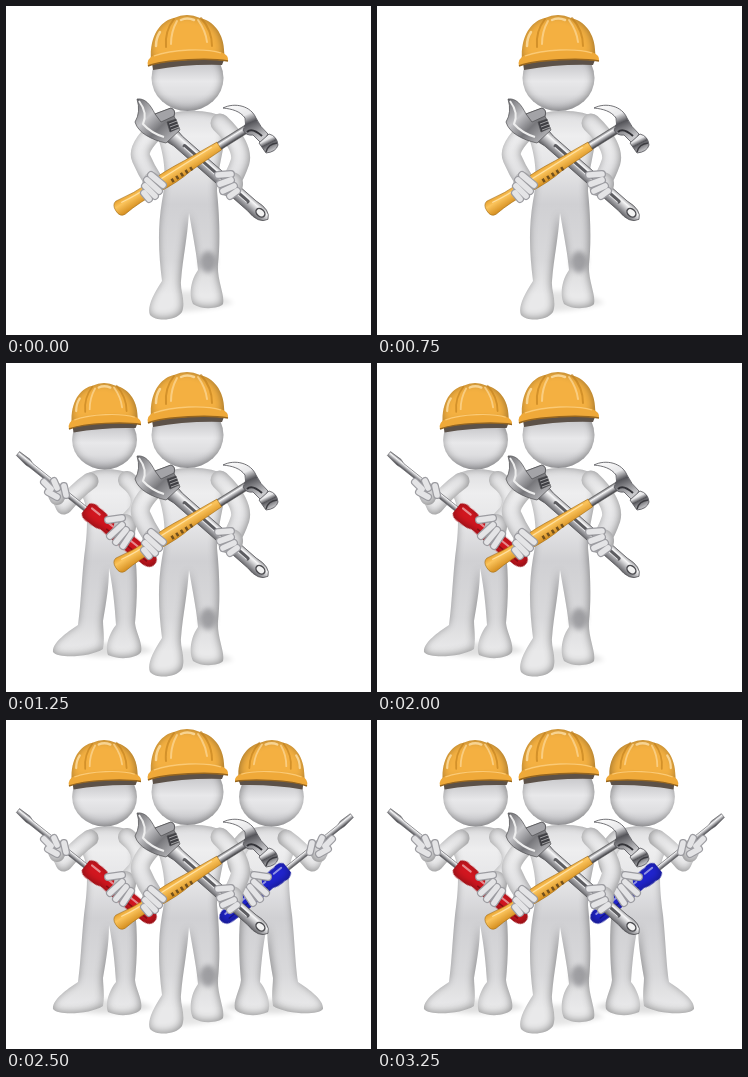
Recreate the animation shown at these times as an HTML page. Size 365 by 329 pixels, loop 3.75 s.

```html
<!DOCTYPE html>
<html lang="en">
<head>
<meta charset="utf-8">
<title>Three workers</title>
<style>
html, body { margin: 0; width: 100%; height: 100%; overflow: hidden; background: #fff; }
svg { display: block; width: 100vw; height: 100vh; }
path { stroke-linejoin: round; }
.body > * { fill: url(#skin); filter: url(#shade); }
.arm { fill: none !important; stroke: url(#skin); stroke-linecap: round; }
.fingers { fill: none; stroke-linecap: round; }
.fingers path:first-child { stroke: #9c9ca1; stroke-width: 8; }
.fingers path:last-child { stroke: #e4e4e6; stroke-width: 5.6; }
.palm { fill: #e2e2e4; filter: url(#shade); }
.soft { filter: url(#blur); }
.driver { transform: scale(var(--size)); }
</style>
</head>
<body>
<svg viewBox="0 0 365 329">
<defs>
  <!-- darkens the rim of a shape, mostly at the lower right -->
  <filter id="shade" filterUnits="userSpaceOnUse" x="-200" y="-50" width="600" height="420" color-interpolation-filters="sRGB">
    <feGaussianBlur in="SourceAlpha" stdDeviation="4.5"/>
    <feOffset dx="-1" dy="-1" result="core"/>
    <feComposite in="SourceAlpha" in2="core" operator="out"/>
    <feComponentTransfer result="rim"><feFuncA type="linear" slope=".4"/></feComponentTransfer>
    <feMerge><feMergeNode in="SourceGraphic"/><feMergeNode in="rim"/></feMerge>
  </filter>
  <filter id="blur" x="-50%" y="-50%" width="200%" height="200%"><feGaussianBlur stdDeviation="2.5"/></filter>
  <linearGradient id="skin" gradientUnits="userSpaceOnUse" x1="0" y1="104" x2="0" y2="304">
    <stop stop-color="#dcdcde"/><stop offset=".13" stop-color="#eeeeef"/>
    <stop offset=".3" stop-color="#e4e4e6"/><stop offset=".47" stop-color="#d0d0d3"/>
    <stop offset=".75" stop-color="#d9d9db"/><stop offset=".92" stop-color="#e9e9ea"/>
  </linearGradient>
  <linearGradient id="face" x2="0" y2="1">
    <stop offset=".25" stop-color="#c4c4c7"/><stop offset=".55" stop-color="#e8e8ea"/>
    <stop offset=".75" stop-color="#dedee0"/><stop offset="1" stop-color="#bcbcc0"/>
  </linearGradient>
  <linearGradient id="steel" x2="0" y2="1">
    <stop stop-color="#67676b"/><stop offset=".3" stop-color="#f7f7f8"/>
    <stop offset=".6" stop-color="#a2a2a6"/><stop offset="1" stop-color="#343438"/>
  </linearGradient>
  <linearGradient id="jaw" x2="1" y2="1">
    <stop stop-color="#66666a"/><stop offset=".35" stop-color="#c4c4c7"/>
    <stop offset=".6" stop-color="#77777b"/><stop offset="1" stop-color="#cfcfd2"/>
  </linearGradient>
  <linearGradient id="chrome" x2=".5" y2="1">
    <stop stop-color="#fff"/><stop offset=".4" stop-color="#e8e8ea"/>
    <stop offset=".6" stop-color="#55555a"/><stop offset="1" stop-color="#c9c9cc"/>
  </linearGradient>
  <linearGradient id="grip" x2="0" y2="1">
    <stop stop-color="#e7a02c"/><stop offset=".35" stop-color="#fbc45c"/><stop offset="1" stop-color="#d48d1e"/>
  </linearGradient>

  <g id="head">
    <ellipse cx="181.5" cy="72" rx="36" ry="33" fill="url(#face)" filter="url(#shade)"/>
    <path d="M146 57Q180 50 218 54L216 59Q180 58 147 64Z" fill="#5c5148"/>
    <path d="M145 55C143 27 157 14 168 12Q181 6 194 12C208 15 220 29 218 52Z" fill="#f4b041" filter="url(#shade)"/>
    <g fill="none" stroke-linecap="round">
      <path d="M168 13C161 22 159 31 160 41M195 12C203 21 206 30 206 40" stroke="#bf7d1b" stroke-width="2" opacity=".6"/>
      <path d="M171 15C167 22 165 30 165 38M192 14C197 21 200 28 201 36" stroke="#fcd590" stroke-width="2" opacity=".8"/>
      <path d="M175 14Q181 11 188 14M154 26Q150 32 150 40" stroke="#fde0a8" stroke-width="2.5" opacity=".8"/>
    </g>
    <path d="M142 60Q140 53 148 49C165 42 201 41 215 46Q223 49 222 55C205 52 160 53 142 60Z" fill="#efa939"/>
    <path d="M148 50C166 43 200 42 215 47" fill="none" stroke="#fbca75" stroke-width="1.3"/>
    <path d="M142 60C160 53 205 52 222 55" fill="none" stroke="#96651e" stroke-width="1.5"/>
  </g>

  <g id="driver">
    <path d="M-176-3L-163-3.5L-158-2H-84V3H-158L-163 3.5L-176 2Z" fill="url(#steel)" stroke="#66666a" stroke-width=".6"/>
    <path d="M-89-6Q-85-11-78-9Q-70-10-64-7Q-40-9-12-8Q0-8 0 0Q0 8-12 8Q-40 9-64 7Q-70 10-78 9Q-85 11-89 6Z" fill="currentColor" filter="url(#shade)"/>
    <path d="M-84-4H-74M-62-3H-8" stroke="#fff" stroke-width="2" stroke-linecap="round" opacity=".5"/>
    <path d="M-60 3H-8" stroke="#000" stroke-width="1.5" opacity=".3"/>
  </g>

  <g id="mate">
    <path d="M60 289Q100 299 148 288L130 280H80Z" opacity=".12" class="soft"/>
    <g class="body">
      <path d="M77 114C86 104 116 104 127 113C134 130 128 160 129 190C132 215 131 240 129 260C130 270 137 280 135 289C130 296 112 297 102 292C99 285 102 272 110 262C109 245 107 225 103 205C103 225 100 240 97 258C97 265 99 275 97 286C85 294 52 296 47 289C46 280 60 270 72 262C75 240 75 225 78 195C80 180 84 150 77 135Z"/>
      <path class="arm" d="M84 118Q70 128 58 143L52 130" stroke-width="17"/>
      <path class="arm" d="M121 117C134 127 137 139 131 149L118 163" stroke-width="18"/>
    </g>
    <use href="#head" transform="translate(-64.8 12) scale(.9)"/>
    <g transform="translate(149 201) rotate(38.7)"><use class="driver" href="#driver"/></g>
    <ellipse class="palm" cx="51" cy="131" rx="9" ry="11"/>
    <g class="fingers"><path d="M38 119L45 126M48 118L51 125M42 129L51 134M58 123L60 132"/><path d="M38 119L45 126M48 118L51 125M42 129L51 134M58 123L60 132"/></g>
    <ellipse class="palm" cx="119" cy="163" rx="11" ry="12"/>
    <g class="fingers"><path d="M116 155L102 157M116 162L104 173M120 167L110 179M125 171L117 183"/><path d="M116 155L102 157M116 162L104 173M120 167L110 179M125 171L117 183"/></g>
  </g>
</defs>

<use id="left" href="#mate" color="#d3161f" style="--size:1"/>
<use id="right" href="#mate" color="#2024cf" style="--size:.955" transform="translate(364) scale(-1 1)"/>

<path d="M150 306Q190 308 228 297L205 285H165Z" opacity=".1" class="soft"/>
<g class="body">
  <path d="M153 114C164 102 207 102 219 113C222 135 211 160 211 185C214 215 214 240 212 258C211 275 219 288 217 298C213 303 195 304 187 298C183 290 184 275 192 264C191 250 187 230 183 207C181 235 177 250 175 275C174 285 180 295 176 306C170 315 150 316 144 309C141 302 146 290 156 275C153 250 151 225 156 195C159 180 161 160 153 135Z"/>
  <path class="arm" d="M157 117C143 130 131 143 135 152Q140 164 148 176" stroke-width="19"/>
  <path class="arm" d="M214 117C229 131 237 146 234 156Q230 168 222 181" stroke-width="19"/>
</g>
<ellipse cx="202" cy="256" rx="8" ry="11" fill="#77777b" opacity=".6" class="soft"/>
<use href="#head"/>

<g id="wrench" stroke="#4c4c50" stroke-width=".7">
  <g transform="translate(150 115) rotate(41.3)">
    <path d="M10-9L30-6H128Q145-9 149 0Q145 10 128 7H30L5 11Z" fill="url(#steel)"/>
    <path d="M38 0H122" stroke="#5c5c60" stroke-width="4" stroke-linecap="round"/>
    <path d="M38 1.5H122" stroke="#e4e4e6" stroke-width="1.2"/>
    <ellipse cx="139" cy="0" rx="5" ry="3.6" fill="#f3f3f3" stroke-width="1.5"/>
  </g>
  <path d="M131 93C139 92 144 98 149 108L165 102Q170 104 168 110L174 124L160 137C146 134 132 127 129 116Q135 106 131 93Z" fill="url(#jaw)"/>
  <path d="M149 108L165 102Q170 104 168 110L155 116Z" fill="#a3a3a7"/>
  <path d="M133 95Q142 107 137 118Q145 127 158 131" fill="none" stroke="#eee" stroke-width="2"/>
  <path d="M161 116L170 113L173 122L164 126Z" fill="#3f3f44"/>
  <path d="M163 118L171 115M164 121L172 118M165 124L173 121" stroke="#ccc"/>
</g>

<g id="hammer">
  <g transform="translate(114 202) rotate(-32)">
    <path d="M112-4H152V4H112Z" fill="url(#steel)" stroke="#555" stroke-width=".5"/>
    <path d="M0-8Q-5-7-5 0Q-5 8 1 8Q20 5 42 7Q62 9 80 6L117 4.5V-4.5L80-6Q55-8 40-6Q20-5 0-8Z" fill="url(#grip)" stroke="#a87219" stroke-width=".6"/>
    <path d="M58 4.5H83" stroke="#72501d" stroke-width="4" stroke-dasharray="2.5 3"/>
    <path d="M4-4Q20-2 40-3H110" fill="none" stroke="#ffe0a0" stroke-width="1.2"/>
  </g>
  <path d="M217 102C229 96 245 100 250 112Q254 121 262 128L256 138L247 129Q240 130 237 124Q241 118 239 112C234 105 226 103 217 102Z" fill="url(#chrome)" stroke="#505055" stroke-width=".8"/>
  <path d="M241 126Q246 121 256 130" fill="none" stroke="#333338" stroke-width="2"/>
  <path d="M253 137L263 128Q271 130 272 139Q270 146 260 147Z" fill="url(#chrome)" stroke="#505055" stroke-width=".8"/>
  <path d="M260 146Q262 138 271 137" fill="none" stroke="#3c3c41" stroke-width="1.5"/>
</g>

<ellipse class="palm" cx="146" cy="179" rx="10" ry="13"/>
<g class="fingers"><path d="M145 169L157 179M141 174L153 185M139 180L149 190M138 187L143 193"/><path d="M145 169L157 179M141 174L153 185M139 180L149 190M138 187L143 193"/></g>
<ellipse class="palm" cx="226" cy="178" rx="11" ry="12"/>
<g class="fingers"><path d="M225 168L212 169M225 174L214 178M228 180L217 185M231 185L224 190"/><path d="M225 168L212 169M225 174L214 178M228 180L217 185M231 185L224 190"/></g>
</svg>
<script>
const STEP = 1250;
const mates = ['left', 'right'].map(id => document.getElementById(id));

function draw() {
  const step = Math.floor(performance.now() % (3 * STEP) / STEP);
  mates.forEach((mate, i) => mate.style.visibility = step > i ? 'visible' : 'hidden');
  requestAnimationFrame(draw);
}
draw();
</script>
</body>
</html>
```
